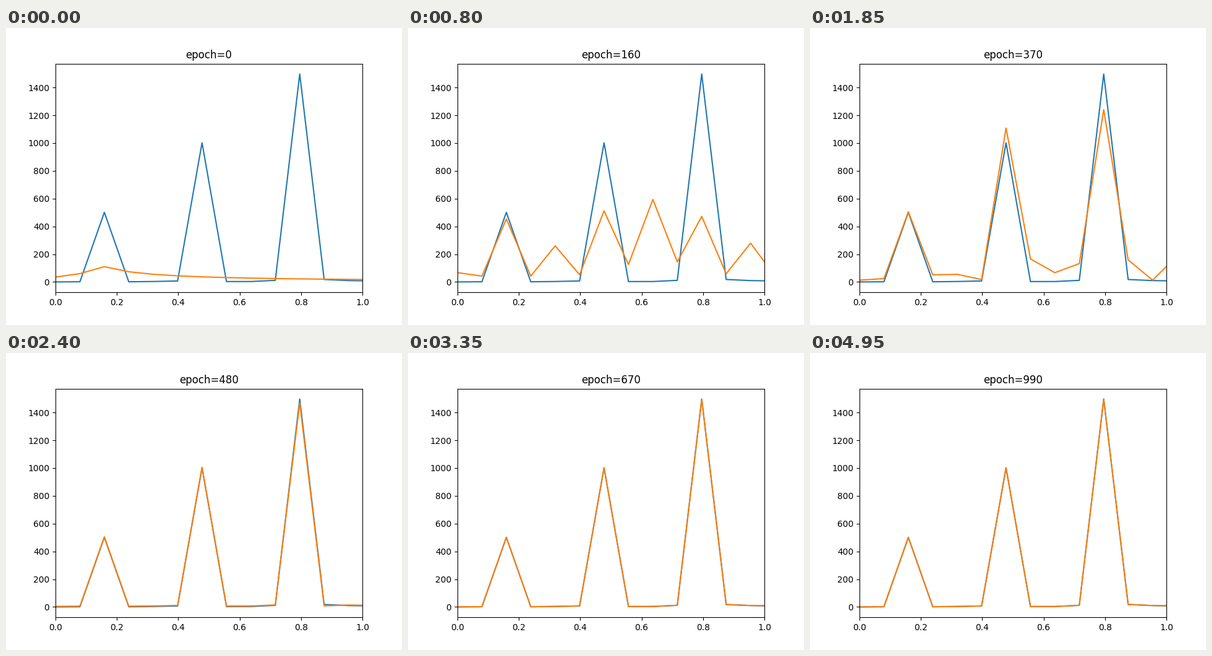
Write a matplotlib script that moves like this. It is 640 px wide and 480 px high and loops after 5 s.

```python
import numpy as np
import matplotlib.pyplot as plt
from matplotlib.animation import FuncAnimation

FRAMES, INTERVAL, STEP = 100, 50, 10
SETTLE = 85  # decay constant of the late fitting error, in epochs

# Spectrum of the signal being learned
t = np.linspace(0, 4 * np.pi, 1000)
signal = np.sin(t) + 2 * np.sin(3 * t) + 3 * np.sin(5 * t)
k = np.arange(14)
freq = k / (4 * np.pi)
goal = np.abs(np.fft.fft(signal))[k]
even = k % 2 == 0


def bump(center, width):
    return np.exp(-((k - center) / width) ** 2)


def untrained():
    return np.where(k < 2, 35 + 25 * k, 220 / np.maximum(k, 1))


def spread():
    """Energy sits in every even bin, with low valleys between."""
    fit = 42 + 120 * bump(8.2, 2)
    fit[even] = 67, 453, 260, 512, 594, 472, 279
    return fit


def focused():
    """The three peaks stand out over a floor that rises with frequency."""
    floor = np.where(even, 13 + 55 * np.sin(np.pi * k / 12), 10.5 + 13.5 * k)
    fit = floor + 165 * (k - 6) * bump(6, 1)
    fit[[2, 6, 10]] = 505, 1108, 1240
    return fit


def near_goal():
    return goal + 4 - 38 * bump(10.3, 0.7)


epochs = np.array([0, 160, 370, 480])
fits = np.array([untrained(), spread(), focused(), near_goal()])


def monotone_slopes(x, y):
    """Slopes that keep a cubic through the points free of overshoot."""
    d = np.diff(y, axis=0) / np.diff(x)[:, None]
    a, b = d[:-1], d[1:]
    same = a * b > 0
    slopes = np.zeros_like(y)
    slopes[1:-1] = np.where(same, 2 * a * b / np.where(same, a + b, 1), 0)
    return slopes


slopes = monotone_slopes(epochs, fits)


def fit_at(epoch):
    if epoch >= epochs[-1]:
        return goal + (fits[-1] - goal) * np.exp((epochs[-1] - epoch) / SETTLE)
    i = np.searchsorted(epochs, epoch, side="right") - 1
    h = epochs[i + 1] - epochs[i]
    u = (epoch - epochs[i]) / h
    ease = u * u * (3 - 2 * u)
    return (fits[i] * (1 - ease) + fits[i + 1] * ease
            + h * u * (1 - u) * ((1 - u) * slopes[i] - u * slopes[i + 1]))


fig, ax = plt.subplots(figsize=(6.4, 4.8), dpi=100)
ax.plot(freq, goal, color="tab:blue")
fit_line, = ax.plot(freq, fit_at(0), color="tab:orange")
ax.set_xlim(0, 1)
ax.set_ylim(-0.05 * goal.max(), 1.05 * goal.max())
title = ax.set_title("epoch=0")


def update(frame):
    epoch = frame * STEP
    fit_line.set_ydata(fit_at(epoch))
    title.set_text(f"epoch={epoch}")
    return fit_line, title


anim = FuncAnimation(fig, update, frames=FRAMES, interval=INTERVAL,
                     repeat=True, repeat_delay=0)
plt.show()
```
